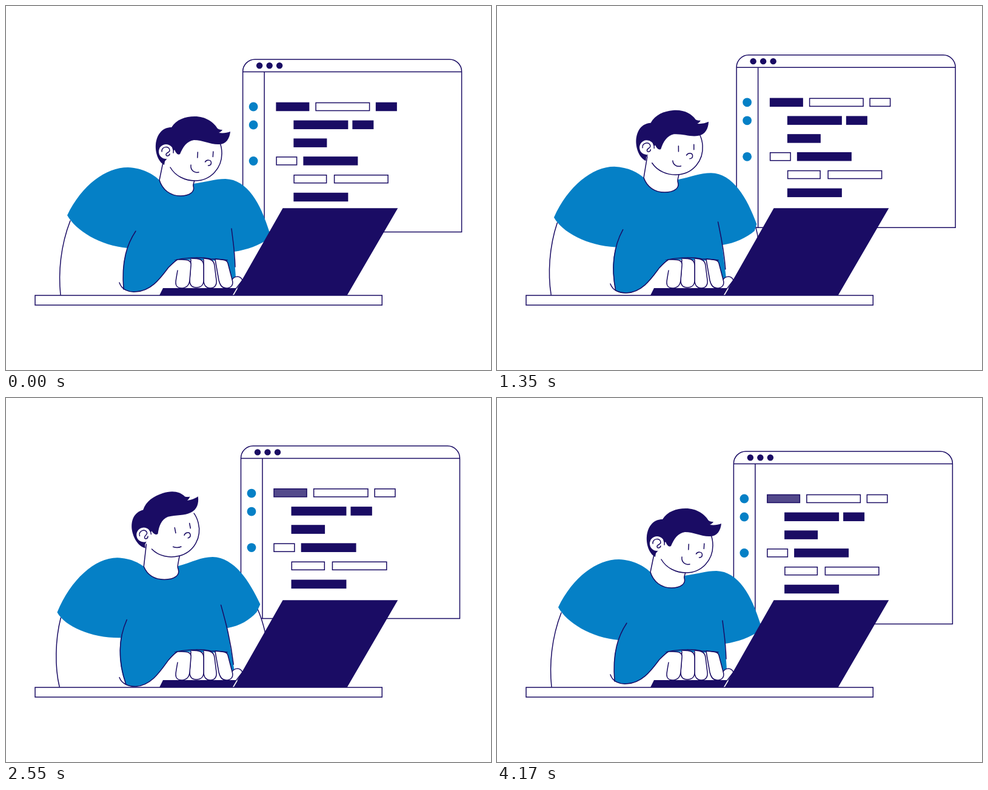
These frames come from a looping animation (800x600 px, 4200 ms). An HTML page with a canvas:

```html
<!DOCTYPE html>
<html lang="en">
<head>
<meta charset="utf-8">
<title>Coding at a desk</title>
<style>
html, body { margin: 0; width: 100%; height: 100%; overflow: hidden; background: #fff; }
canvas { display: block; }
</style>
</head>
<body>
<canvas id="stage" width="800" height="600"></canvas>
<script>
const g = document.getElementById('stage').getContext('2d');
const NAVY = '#1a0c64', BLUE = '#0580c6', WHITE = '#fff', PINK = '#f8c8cc';
const LOOP = 4200, STEP = 30;

// Eased value from a flat list: time, value, time, value...
function key(t, ...k) {
  if (t <= k[0]) return k[1];
  for (let i = 2; i < k.length; i += 2) {
    if (t < k[i]) {
      const u = (t - k[i - 2]) / (k[i] - k[i - 2]);
      return k[i - 1] + (k[i + 1] - k[i - 1]) * (1 - Math.cos(Math.PI * u)) / 2;
    }
  }
  return k[k.length - 1];
}

const numbers = s => s.match(/[\d.]+/g).map(Number);

// Blend a path towards one or two other poses with the same commands.
function mix(rest, a, u, b = rest, v = 0) {
  const p = numbers(a), q = numbers(b);
  let i = 0;
  return rest.replace(/[\d.]+/g, n => {
    const r = +n + (p[i] - n) * u + (q[i] - n) * v;
    i++;
    return r.toFixed(2);
  });
}

function draw(path, fill, stroke) {
  const p = new Path2D(path);
  if (fill) { g.fillStyle = fill; g.fill(p); }
  if (stroke) { g.strokeStyle = stroke; g.stroke(p); }
}

function dot(x, y, r, color) {
  g.fillStyle = color;
  g.beginPath();
  g.arc(x, y, r, 0, 7);
  g.fill();
}

function at(x, y, paint) {
  g.save();
  g.translate(x, y);
  paint();
  g.restore();
}

// Code bars: x, row, width, filled
const bars = [
  [55.5, 0, 53.5, 1], [120.5, 0, 88.5, 0], [220, 0, 33.5, 1],
  [84.5, 1, 88.5, 1], [181.5, 1, 33.5, 1],
  [84.5, 2, 53.5, 1],
  [55.5, 3, 33.5, 0], [100.5, 3, 88.5, 1],
  [84.5, 4, 53.5, 0], [151, 4, 88.5, 0],
  [84.5, 5, 88.5, 1]
];

function editor(t) {
  draw('M0 284.5V20A20 20 0 0 1 20 0H341A20 20 0 0 1 361 20V284.5ZM0 20.5H361M35.5 20.5V284.5', WHITE, NAVY);
  for (const x of [27.5, 44, 60.5]) dot(x, 10.3, 5.2, NAVY);
  for (const y of [78, 108, 167.5]) dot(17.5, y, 7.4, BLUE);
  if (t >= 1650 && t < 1710) dot(17.5, 108, 5.3, PINK);

  const fade = {
    0: key(t, 1700, 1, 2130, .75),
    2: key(t, 0, 1, 500, 0),
    7: key(t, 1900, 1, 2160, .5, 2420, 1)
  };
  const zoom = key(t, 2400, 1, 2940, 1.055, 3480, 1);
  g.translate(155, 152.5);
  g.scale(zoom, zoom);
  g.translate(-155, -152.5);
  bars.forEach(([x, row, w, filled], i) => {
    const y = 71.5 + row * 29.8;
    g.globalAlpha = filled ? fade[i] ?? 1 : 0;
    g.fillStyle = NAVY;
    g.fillRect(x, y, w, 13);
    g.globalAlpha = 1;
    g.strokeStyle = NAVY;
    g.strokeRect(x, y, w, 13);
  });
}

function body(pose) {
  const arm = pose('M435 374Q435 382 434 390', 'M413 345Q422 365 427 387', 'M431 373Q430 380 429 390');
  draw(arm + pose('L400 445L376 405', 'L400 432L364 377', 'L400 440L376 402'), WHITE);
  draw(arm, null, NAVY);
  draw(pose(
    'M106 354C90 395 86 440 90 476',
    'M89 363C80 400 80 445 88 476',
    'M109 365C98 400 95 440 101 476'), WHITE, NAVY);

  // Shirt
  draw(pose(
    'M101 345C125 295 165 266 201 266C225 267 243 277 253 287L309 293C330 290 345 285 362 285C398 286 420 325 435 374L433 384C418 394 398 402 376 405L379 447L373 450L362 420L283 418C279 420 275 424 268 431C255 448 240 470 214 471C206 472 200 470 194 467C192 440 192 420 201 399C155 395 115 370 101 345Z',
    'M83 354C105 300 145 263 182 263C205 264 218 272 225 277L281 276C305 269 320 260 339 260C375 261 400 300 418 337L412 350C400 364 385 373 364 377L376 447L373 450L362 420L283 418C279 420 275 424 268 432C255 450 240 474 214 476C208 477 202 475 198 472C186 445 186 420 188 395C140 396 95 377 83 354Z',
    'M104 355C127 300 168 269 204 269C226 270 240 277 249 285L305 292C328 287 343 282 360 282C396 283 418 322 434 368L433 374C420 388 398 400 376 402L377 416L375 418L370 418L295 416C290 418 286 421 279 430C265 446 252 472 226 475C218 476 212 475 207 472C203 445 202 425 207 402C160 399 118 378 104 355Z'
  ), BLUE);
  draw(pose(
    'M214 371C200 392 190 420 194 467',
    'M198 365C185 395 183 430 198 472',
    'M217 372C203 395 202 425 208 472'), null, NAVY);
  draw(pose(
    'M372 367C374 385 377 400 378 430',
    'M353 339C362 370 370 400 375 440',
    'M370 363C373 380 376 395 377 415'), null, NAVY);
  draw(pose(
    'M187 456C191 468 203 472 214 471C240 470 255 448 268 431C275 424 279 420 283 418',
    'M187 461C191 472 203 476 214 476C240 474 255 450 268 432C275 424 279 420 283 418',
    'M198 461C203 471 214 476 226 475C252 472 265 446 279 430C286 421 290 418 295 416'), null, NAVY);

  // Neck
  draw(pose(
    'M260 253L253 287C258 303 271 313 288 313C303 313 312 306 309 297C308 294 310 292 311 287',
    'M229 240L225 277C231 291 243 298 259 298C276 298 285 291 282 281C280 277 281 275 284 258',
    'M256 253L249 285C254 301 267 311 284 311C299 311 308 304 306 295C305 292 306 290 307 287'), WHITE, NAVY);
}

function head(lean, smile) {
  draw('M271 266C279 280 295 288 312 288C338 288 356 267 356 243C356 236 355 231 353 226', WHITE, NAVY);
  draw(mix(
    'M261 262C250 256 246 240 247 228C249 210 259 200 273 200C281 187 296 182 311 182C330 182 343 192 349 202C352 204 355 204 357 204C355 207 353 208 351 209C358 210 365 209 370 207C369 218 363 228 352 228C338 229 325 221 310 221C298 223 292 232 287 244C284 246 281 244 278 237L262 256Z',
    'M261 262C250 256 246 240 247 228C249 210 259 200 273 200C281 187 296 182 311 181C328 180 339 185 345 195C348 197 351 197 353 197C351 200 349 201 347 202C354 203 361 202 366 200C365 211 359 221 348 223C336 226 325 221 310 221C298 223 292 232 287 244C284 246 281 244 278 237L262 256Z',
    lean), NAVY);
  dot(264, 240, 12, WHITE);
  draw('M257 240C256 231 270 230 270 238C270 242 264 241 264 245C264 248 269 248 270 244M275 234Q277 238 276 242', null, NAVY);
  draw('M316.3 241L315.8 250M341.8 240L341.3 248.5', null, NAVY);
  draw('M328.5 257C331 253 338 253 338.5 258C338.5 262 336 263 333.5 263', null, NAVY);
  draw(mix('M306 271C309 273 314 275 319 274', 'M305 262C304 270 310 276 318 274', smile), null, NAVY);
}

function hand() {
  draw('M372 453C376 444 386 444 390 452L380 465', WHITE, NAVY);
  draw('M345 418L351 452C353 461 357 465 363 465C371 465 376 460 373 451L366 424C364 418 358 418 345 417', WHITE, NAVY);
  draw('M326 418V452C326 461 331 465 337 465C344 465 348 460 347 452L344 428C343 419 338 417 326 416', WHITE, NAVY);
  draw('M305 418L303 452C303 461 308 464 314 464C321 464 326 460 326 452V428C326 418 320 416 305 416', WHITE, NAVY);
  draw('M283 418L290 418C301 418 306 420 305 428L303 452C302 461 297 465 289 465C284 465 280 462 280 456C280 452 281 448 283 436', WHITE);
  draw('M283 436C281 448 280 452 280 456C280 462 284 465 289 465C297 465 302 461 303 452L305 428C306 420 301 418 290 418L283 418C300 414 325 414 338 417Q352 417 365 419', null, NAVY);
}

function desk() {
  draw('M259 465H381L375 477H253Z', NAVY);
  draw('M457 334H645L562 476.5H376Z', NAVY, NAVY);
  draw('M381 466L374.5 477', null, WHITE);
  draw('M48 477H620.3V493H48Z', WHITE, NAVY);
}

function render(t) {
  const lean = key(t, 0, 0, 540, .65, 990, 0, 1320, .4, 1650, 0, 2160, 0, 2600, .95, 2950, .32, 3520, 1.03, 4170, 0);
  const reach = key(t, 1380, 0, 1680, 1, 2010, 0);
  const nod = key(t, 300, 0, 990, 1, 2160, 1, 2700, 0);
  const smile = key(t, 1200, 1, 1620, 0, 2960, 0, 3400, 1);
  const turn = 2 * Math.PI * t / LOOP;
  const pose = (rest, back, forward) => mix(rest, back, lean, forward, reach);

  g.fillStyle = WHITE;
  g.fillRect(0, 0, 800, 600);
  g.lineWidth = 1.5;
  g.lineCap = 'round';
  at(390.6 + 5 * Math.sin(turn), 83 + 5 * Math.cos(turn), () => editor(t));
  body(pose);
  at(312 - 40 * lean - 4 * reach - nod, 245 - 29 * lean - reach + 1.5 * nod, () => {
    g.rotate((2.6 * nod - 16 * lean) * Math.PI / 180);
    g.translate(-312, -245);
    head(lean, smile);
  });
  at(12 * reach, -2 * reach, hand);
  desk();
}

const start = performance.now();
function tick() {
  const t = (performance.now() - start) % LOOP;
  render(Math.floor(t / STEP) * STEP);
  requestAnimationFrame(tick);
}
tick();
</script>
</body>
</html>
```
